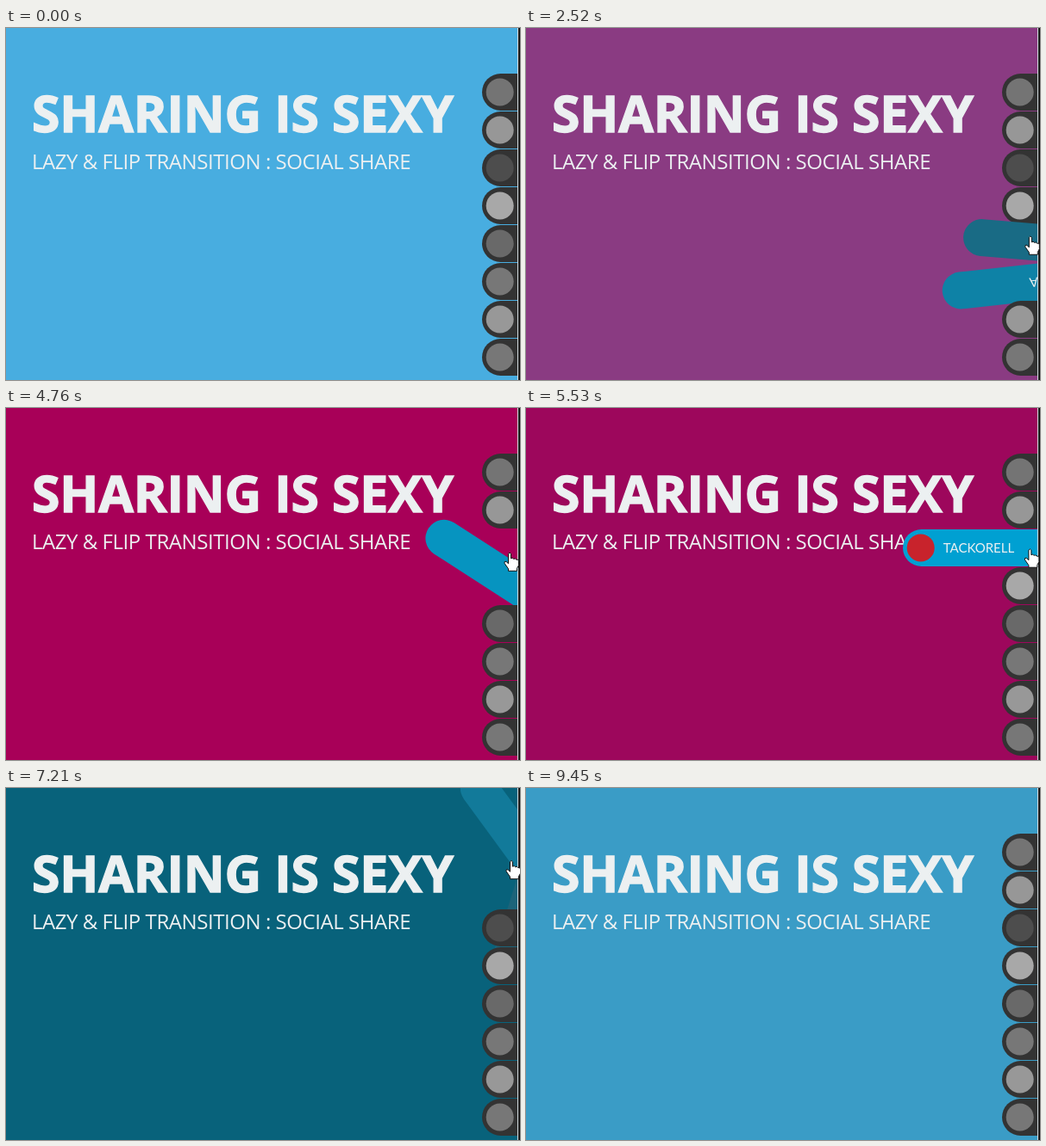
These frames come from a looping animation (596x409 px, 9.52 s). An HTML page:

```html
<!DOCTYPE html>
<html lang="en">
<head>
<meta charset="utf-8">
<title>Lazy flip share bar</title>
<style>
  html, body { margin: 0; width: 100%; height: 100%; overflow: hidden; background: #48ade0; }
  svg { display: block; width: 596px; height: 409px; }
  .title { font: 700 59px "Open Sans", sans-serif; letter-spacing: -.2px; fill: #ecf0f1; stroke: #ecf0f1; stroke-width: 1.4px; }
  .sub { font: 400 24px "Open Sans", sans-serif; letter-spacing: -.45px; fill: #ecf0f1; }
  .label { font: 400 15px Lato, sans-serif; fill: #ecf0f1; }
  .cursor { fill: #fff; stroke: #111; stroke-width: 1; stroke-linejoin: round; }
</style>
</head>
<body>
<svg viewBox="0 0 596 409">
  <rect id="bg" width="596" height="409"/>
  <text class="title" x="30" y="120.5">SHARING IS SEXY</text>
  <text class="sub" x="30" y="164">LAZY &amp; FLIP TRANSITION : SOCIAL SHARE</text>
  <g id="bar"></g>
  <rect x="593" width="1" height="409" fill="#d5dde2"/>
  <rect x="594" width="2" height="409" fill="#1b1b1b"/>
  <g id="cursor" class="cursor">
    <path id="hand" d="M-1.5 1.5Q0-1 1.5 1.5V7Q3.5 5.5 4.7 7.6Q6.5 6.3 7.8 8.4Q10 7.6 10.5 10V15L8.5 18.5V21.5H-1.5V19L-6 12.5Q-6.5 9.8-4 10.6L-1.5 13Z"/>
    <path id="resize" d="M-7 0L-2.5-4.5V-1.5H2.5V-4.5L7 0L2.5 4.5V1.5H-2.5V4.5Z"/>
  </g>
</svg>
<script>
const LOOP = 9520, STEP = 70, FLIP = 900;
const RIGHT = 716, REST = 552, SLIDE = 115, H = 43;
const $ = id => document.getElementById(id);
const lerp = (a, b, k) => a + (b - a) * k;
const clamp = k => Math.min(1, Math.max(0, k));
const mix = (a, b, k) => a.map((v, i) => lerp(v, b[i], k));
const rgb = c => `rgb(${c.map(Math.round)})`;
const hex = s => [1, 3, 5].map(i => parseInt(s.slice(i, i + 2), 16));

// label, resting disc, active disc, hover start, hover end
const items = [
  ['FRENDALO', '#747474', '#5070c0', 6870, 8230],
  ['CHIRVEX', '#979797', '#33aadd', 6220, 6850],
  ['TACKORELL', '#4d4d4d', '#c8232c', 4607, 6170],
  ['RSS', '#a8a8a8', '#ff9a1c', 3075, 4535],
  ['STUMVO', '#696969', '#3a5878', 2250, 2850],
  ['QUILLDORA', '#777777', '#4488aa', 1460, 2250],
  ['FLUZO', '#989898', '#44aadd', 1200, 1400],
  ['JOBRANTO', '#777777', '#4488b0', 420, 1070]
].map(([label, off, on, start, end], i) => {
  const group = add('g', $('bar'));
  const pill = add('rect', group, { y: -H / 2, height: H, rx: H / 2 });
  const disc = add('circle', group, { r: 16 });
  const text = add('text', group, { class: 'label', y: 5.5 });
  text.textContent = label;
  return { group, pill, disc, text, off: hex(off), on: hex(on), start, end, y: 74.5 + 44 * i };
});

const backdrop = [
  [0, [72, 173, 224]], [280, [72, 173, 224]], [1610, [118, 96, 160]],
  [3570, [160, 16, 96]], [4760, [168, 0, 88]], [5460, [168, 0, 88]],
  [6440, [8, 104, 140]], [7910, [8, 92, 108]], [8190, [8, 92, 108]],
  [9450, [58, 156, 198]], [LOOP, [58, 156, 198]]
];
const pointer = [
  [0, [620, 385]], [350, [620, 385]], [500, [584, 376]], [1060, [583, 372]],
  [1200, [582, 340]], [1460, [579, 296]], [1610, [579, 290]], [2180, [582, 282]],
  [2280, [584, 246]], [2850, [586, 236]], [3080, [590, 204]], [3570, [590, 200]],
  [4400, [590, 192]], [4620, [584, 168]], [5390, [584, 167]], [6120, [586, 150]],
  [6280, [588, 107]], [6800, [588, 104]], [6900, [586, 86]], [7770, [586, 81]],
  [7910, [586, 81]], [8050, [588, 72]], [8230, [588, 72]], [8400, [640, 72]], [LOOP, [640, 72]]
];

function add(tag, parent, attrs = {}) {
  return set(parent.appendChild(document.createElementNS('http://www.w3.org/2000/svg', tag)), attrs);
}
function set(el, attrs) {
  for (const k in attrs) el.setAttribute(k, attrs[k]);
  return el;
}
function track(keys, t) {
  const i = Math.max(1, keys.findIndex(k => k[0] > t));
  const [t0, a] = keys[i - 1], [t1, b] = keys[i];
  return mix(a, b, (t - t0) / (t1 - t0));
}

// cubic-bezier(.25, .1, .25, 1)
function ease(x) {
  if (x <= 0) return 0;
  if (x >= 1) return 1;
  const curve = (a, b, s) => 3 * a * s * (1 - s) ** 2 + 3 * b * s * s * (1 - s) + s ** 3;
  let lo = 0, hi = 1;
  for (let i = 0; i < 20; i++) {
    const mid = (lo + hi) / 2;
    if (curve(.25, .25, mid) < x) lo = mid; else hi = mid;
  }
  return curve(.1, 1, lo);
}

function drawItem(it, t) {
  const leaving = t >= it.end;
  let turn = ease((Math.min(t, it.end) - it.start) / FLIP);
  if (leaving) turn *= 1 - ease((t - it.end) / FLIP);
  const slide = leaving ? clamp(turn + .5 * turn * (1 - turn)) : turn ** 1.4;
  const tint = leaving ? clamp(1.5 * turn) : turn;

  const left = REST - SLIDE * slide, width = RIGHT - left, icon = 20.7 - width / 2;
  set(it.group, { transform: `translate(${left + width / 2} ${it.y}) rotate(${360 * turn})` });
  set(it.pill, { x: -width / 2, width, fill: rgb(mix([51, 51, 51], [0, 160, 210], tint)) });
  set(it.disc, { cx: icon, fill: rgb(mix(it.off, it.on, clamp(tint * 4))) });
  set(it.text, { x: icon + 26 });
}

function draw(t) {
  set($('bg'), { fill: rgb(track(backdrop, t)) });
  items.forEach(it => drawItem(it, t));
  const [x, y] = track(pointer, t);
  const resizing = x > 589 && t > 2850 && t < 4620;
  set($('cursor'), { transform: `translate(${x} ${y})` });
  set($('hand'), { visibility: resizing ? 'hidden' : 'visible' });
  set($('resize'), { visibility: resizing ? 'visible' : 'hidden' });
}

const begin = performance.now();
function tick() {
  const t = (performance.now() - begin) % LOOP;
  draw(Math.floor(t / STEP) * STEP);
  requestAnimationFrame(tick);
}
tick();
</script>
</body>
</html>
```
